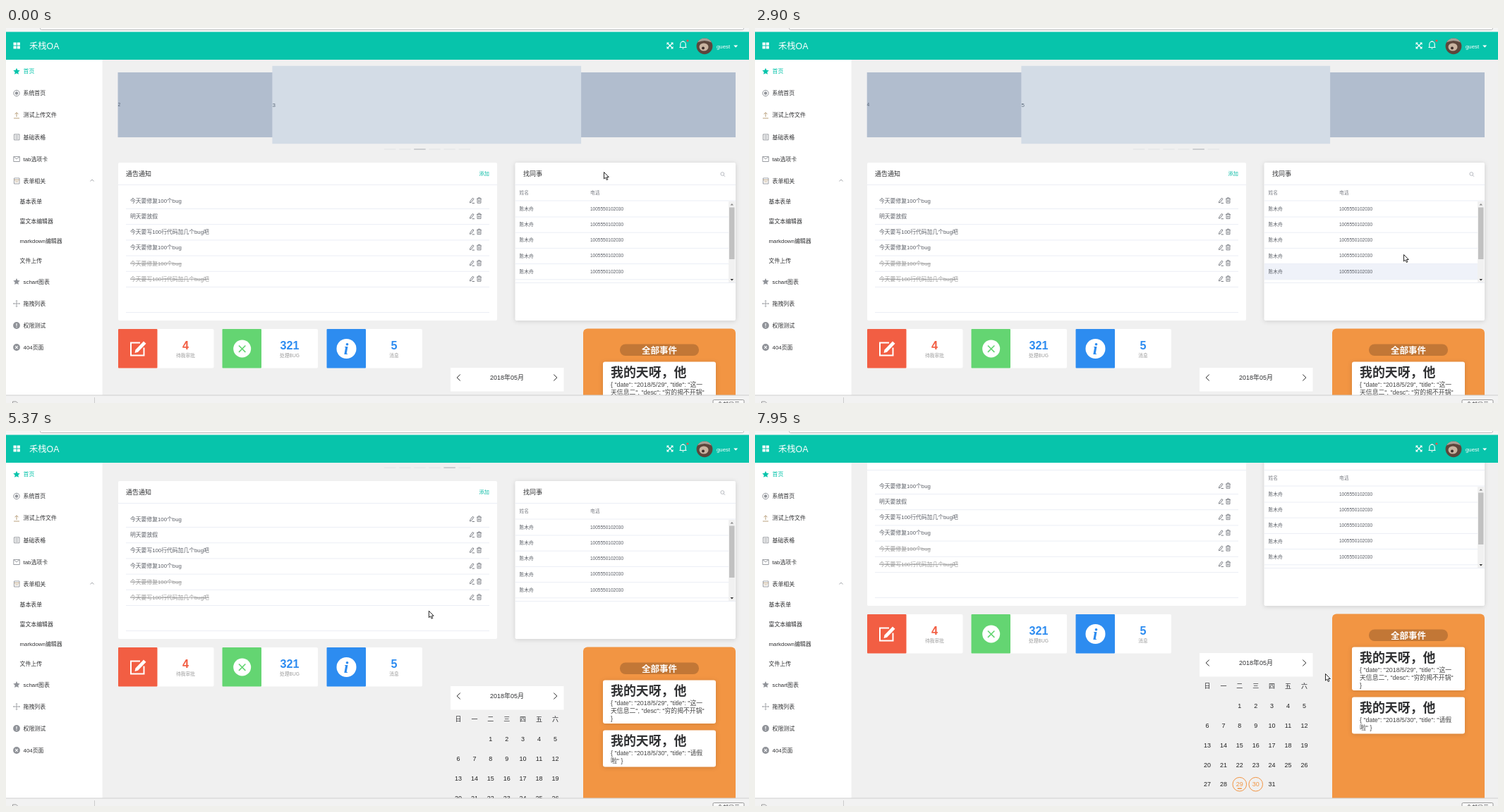
Animation of 1053x532 px, one loop 8000 ms. Source, as an HTML page:

```html
<!DOCTYPE html>
<html>
<head>
<meta charset="utf-8">
<title>OA dashboard</title>
<style>
html, body { margin: 0; width: 100%; height: 100%; overflow: hidden; background: #f0f0f0; }
#stage { display: block; width: 1053px; height: 532px;
  font-family: "Liberation Sans", Arial, "Noto Sans CJK SC", "Noto Sans CJK", sans-serif; }
.shadow { filter: drop-shadow(0 1px 3px rgba(0,0,0,.14)); }
</style>
</head>
<body>
<svg id="stage" viewBox="0 0 1053 532"></svg>
<script>
const LOOP = 8000, TEAL = '#07c4ab', INK = '#303133', BODY = '#5a5e66', LINE = '#ebeef5', ORANGE = '#f29543';
const ROW = 22.2, SLIDES = 6;
const CAR = { x: 158.5, y: 53.5, w: 875.5, h: 111, scale: .83 };

// ---- drawing helpers; text is placed by its vertical centre ----
const rect = (x, y, w, h, fill, more = '') =>
  `<rect x="${x}" y="${y}" width="${w}" height="${h}" fill="${fill}" ${more}/>`;
const circle = (x, y, r, fill, more = '') => `<circle cx="${x}" cy="${y}" r="${r}" fill="${fill}" ${more}/>`;
const stroke = (d, color, w = 1, more = '') =>
  `<path d="${d}" fill="none" stroke="${color}" stroke-width="${w}" ${more}/>`;
const shape = (d, fill, more = '') => `<path d="${d}" fill="${fill}" ${more}/>`;
const text = (x, y, size, str, fill = BODY, more = '') =>
  `<text x="${x}" y="${y + size * .36}" font-size="${size}" fill="${fill}" ${more}>${str}</text>`;
const MID = 'text-anchor="middle"', BOLD = 'font-weight="700"';
const hline = (x1, x2, y, color = LINE) => stroke(`M${x1} ${y}H${x2}`, color);
const times = (n, fn) => Array.from({ length: n }, (_, i) => fn(i)).join('');
const chevron = (x, y, s, dir, color, w = 1) =>
  stroke(`M${x - dir * s / 2} ${y - s}l${dir * s} ${s}l${-dir * s} ${s}`, color, w);
const star = (x, y, r, fill) => {
  const pts = Array.from({ length: 10 }, (_, i) => {
    const a = i * Math.PI / 5, q = i % 2 ? r * .48 : r;
    return [x + q * Math.sin(a), y - q * Math.cos(a)];
  });
  return `<polygon points="${pts}" fill="${fill}"/>`;
};

// ---- page content ----
function notices() {
  const fix = '今天要修复100个bug', write = '今天要写100行代码加几个bug吧';
  const rows = [fix, '明天要放假', write, fix, fix, write];
  return rect(159, 191, 537, 224, '#fff', 'rx="2" class="shadow" id="noticeShadow"')
    + rect(159, 191, 537, 224, '#fff', 'rx="2"')
    + rect(170, 0, 515, ROW, '#f5f7fb', 'id="noticeHover"')
    + text(170, 207, 9, '通告通知', INK) + text(670.5, 206.5, 7.2, '添加', '#10bda8')
    + hline(159, 696, 222.5) + hline(170, 685, 403.5)
    + rows.map((str, i) => {
      const y = 245 + ROW * i, done = i > 3;
      return text(176, y, 7.8, str, done ? '#999' : BODY, done ? 'text-decoration="line-through"' : '')
        + hline(170, 685, y + 11.5)
        + `<g transform="translate(0 ${y - 245})">`
        + stroke('M657.8 246l3.6-4.7 1.6 1.2-3.6 4.8-1.9.7zM660.5 248.5h3.5', BODY, .8)
        + stroke('M667 242.3h7M669 242v-1.2h3v1.2M668 242.5v5.8h5v-5.8M669.7 244v3M671.3 244v3', BODY, .7)
        + '</g>';
    }).join('');
}

function colleagues() {
  const rows = times(6, i => text(5.5, 11 + ROW * i, 6.8, '陈木舟') + text(106, 11 + ROW * i, 6.5, '1005550102030')
    + hline(0, 302, 22.5 + ROW * i));
  return rect(721.5, 191, 312.5, 224, '#fff', 'rx="2" class="shadow"')
    + text(733, 207, 9, '找同事', INK)
    + `<g id="search" fill="none"><circle cx="1015.3" cy="207" r="2.4"/><path d="M1017 208.8l2 2"/></g>`
    + hline(721.5, 1034, 222.5)
    + text(727.5, 233.5, 6.8, '姓名', '#7c7f86') + text(828, 233.5, 6.8, '电话', '#7c7f86')
    + hline(722, 1034, 245)
    + `<svg x="722" y="245.5" width="302" height="116">${rect(0, 0, 302, ROW, '#eff2f9', 'id="tableHover"')}${rows}</svg>`
    + rect(1024, 246, 9.5, 115.5, '#f1f1f1') + rect(1025, 254.5, 7.5, 73.5, '#c1c1c1')
    + shape('M1026.5 251.5h4.5l-2.2-2.5z', '#888') + shape('M1026.5 356h4.5l-2.2 2.5z', '#333')
    + hline(722, 1034, 361.5);
}

function stats() {
  const card = (x, color, icon, num, label, numColor) =>
    rect(x, 427, 135.5, 55.5, '#fff', 'rx="2"') + rect(x, 427, 55.5, 55.5, color, 'rx="1"') + icon
    + text(x + 95.5, 450.5, 16.2, num, numColor, MID + BOLD) + text(x + 95.5, 464.5, 6.7, label, '#999', MID);
  const edit = stroke('M190 446.5h-13v18h18.500v-11', '#fff', 2)
    + shape('M183.500 456.500l11.500-12 3.500 3.300-11.500 12-4.500 1.200z', '#fff');
  const cross = circle(334.7, 455, 12.5, '#fff') + stroke('M330 450.500l9.400 9.400m0-9.400l-9.400 9.400', '#64d572', 1.6);
  const info = circle(482.5, 455, 14, '#fff')
    + text(482, 454.5, 24, 'i', '#2d8cf0', `${MID} font-weight="700" font-style="italic" style="font-family:'Liberation Serif',serif"`);
  return card(159, '#f25e43', edit, '4', '待我审批', '#f25e43')
    + card(306.5, '#64d572', cross, '321', '处理BUG', '#2d8cf0')
    + card(454.5, '#2d8cf0', info, '5', '消息', '#2d8cf0');
}

function calendar() {
  const col = i => 641 + 22.9 * i;
  return rect(630, 482, 160.5, 33.5, '#fff')
    + chevron(641.5, 496, 4.5, -1, '#222') + chevron(778.5, 496, 4.5, 1, '#222')
    + text(710, 496, 9, '2018年05月', INK, MID)
    + [...'日一二三四五六'].map((d, i) => text(col(i), 529, 9, d, INK, MID)).join('')
    + times(31, i => {
      const x = col((i + 2) % 7), y = 557 + 27.8 * Math.floor((i + 2) / 7), marked = i === 28 || i === 29;
      return text(x, y, 9, i + 1, marked ? ORANGE : '#222', MID)
        + (marked ? circle(x, y, 9.8, 'none', `stroke="${ORANGE}"`) : '')
        + (i === 28 ? rect(x - 3, y + 5.3, 6, 1.5, ORANGE) : '');
    });
}

function events() {
  const card = (y, h, lines) => rect(846, y, 160, h, '#fff', 'rx="3" class="shadow"')
    + text(857, y + 15.5, 17.9, '我的天呀，他', INK, BOLD)
    + lines.map((s, i) => text(857, y + 32 + 11.3 * i, 8.85, s, '#444')).join('');
  return rect(818, 426.5, 216, 300, ORANGE, 'rx="6"')
    + rect(870, 448.5, 112, 16.5, '#c27736', 'rx="8"')
    + text(926, 457, 12.5, '全部事件', '#fff', MID + BOLD)
    + card(473.5, 61.5, ['{ "date": "2018/5/29", "title": "这一', '天信息二", "desc": "穷的揭不开锅"', '}'])
    + card(544.5, 52, ['{ "date": "2018/5/30", "title": "请假', '啦" }']);
}

// ---- fixed frame around the page ----
function header() {
  return rect(0, 0, 1053, 6, '#f5f5f5') + rect(48.5, -8, 997, 10.5, '#fff', 'rx="2" stroke="#bbb"')
    + rect(0, 5.5, 1053, 39.5, TEAL)
    + times(4, i => rect(10.5 + 5.2 * (i % 2), 20.5 + 5 * (i >> 1), 4.2, 4, '#fff'))
    + text(33, 25.5, 12.3, '禾栈OA', '#fff')
    + stroke('M937.500 21.500l7 7m0-7l-7 7', '#fff', 1.2)
    + shape('M936.500 20.500h3.500l-3.500 3.500zM945.500 20.500v3.500l-3.500-3.500zM936.500 29.500v-3.500l3.500 3.500zM945.500 29.500h-3.500l3.500-3.500z', '#fff')
    + stroke('M954.500 27.500h10M955.800 27.500v-4.500a3.700 3.700 0 0 1 7.400 0v4.500M958.500 29.300h2M959.500 19v-1', '#fff', 1.1)
    + circle(966, 18, 1.6, '#f0524a')
    + circle(990, 25.8, 11.4, '#5d463c') + shape('M980 20.500a11.400 11.400 0 0 1 20 0q-10-5-20 0z', '#a9a097')
    + `<ellipse cx="989" cy="27" rx="6.500" ry="5.500" fill="#c9b3a0"/>` + circle(988, 28.5, 2, '#3e2e2a')
    + text(1007, 25.8, 7.8, 'guest', '#fff') + shape('M1031.200 24.500h6l-3 3.200z', '#fff');
}

function sidebar() {
  const grey = '#909399';
  const box = y => stroke(`M11.500 ${y - 4}h7.500v8h-7.500z`, grey, .9);
  const badge = (y, d) => circle(15, y, 4.9, grey) + stroke(d, '#fff', 1.1);
  const items = [
    [61.5, '首页', star(15, 61.8, 5, TEAL)],
    [92.5, '系统首页', circle(15, 92.5, 4.2, 'none', `stroke="${grey}"`) + circle(15, 92.5, 2.2, grey)],
    [123.5, '测试上传文件', stroke('M15 126v-6M12.500 122.300l2.500-2.500 2.500 2.500M11 128h8', '#b9a07c')],
    [154.8, '基础表格', box(154.8) + stroke('M13 152.800h4.500M13 154.800h4.500M13 156.800h4.500', grey, .8)],
    [186, 'tab选项卡', stroke('M10.800 182.500h8.500v7h-8.500zl4.200 3.500 4.300-3.500', grey, .9)],
    [217, '表单相关', box(217) + stroke('M11.500 215.500h7.500M13 218h4.500', '#b9a07c', .9)],
    [359.7, 'schart图表', star(15, 360, 5, grey)],
    [391, '拖拽列表', stroke('M15 386.500v9M10.500 391h9M14 387.500l1-1 1 1M14 394.500l1 1 1-1M11.500 390l-1 1 1 1M18.500 390l1 1-1 1', grey, .8)],
    [422, '权限测试', badge(422, 'M15 419v3.700M15 423.700v1.300')],
    [453, '404页面', badge(453, 'M13.200 451.200l3.600 3.600m0-3.600l-3.600 3.600')]
  ];
  const subs = ['基本表单', '富文本编辑器', 'markdown编辑器', '文件上传'];
  return rect(0, 45, 136.5, 476, '#fff')
    + items.map(([y, s, icon], i) => icon + text(24.5, y, 7.9, s, i ? INK : TEAL)).join('')
    + subs.map((s, i) => text(19.5, 245.8 + 28 * i, 7.9, s, INK)).join('')
    + stroke('M119.500 217.500l2.500-2.500 2.500 2.500', grey, .8);
}

function footer() {
  return rect(0, 521, 1053, 11, '#f2f2f2') + hline(0, 1053, 521, '#cfcfcf')
    + stroke('M125.500 524v8', '#ccc') + stroke('M9.500 533v-3h5l2 2', '#999')
    + rect(1002, 527.5, 44, 10, '#fafafa', 'rx="1.500" stroke="#999"') + text(1024, 534, 8, '全部显示', INK, MID);
}

const arrow = (id, x, dir) => `<g id="${id}">${circle(x, 109, 10, '#1f2d3d')}</g>${chevron(x, 109, 2.6, dir, '#fff')}`;

document.getElementById('stage').innerHTML = rect(0, 0, 1053, 532, '#f0f0f0')
  + `<g id="page"><svg id="slides" x="${CAR.x}" y="${CAR.y}" width="${CAR.w}" height="${CAR.h}"></svg><g id="arrows">`
  + arrow('prev', 177.5, -1) + arrow('next', 1015, 1) + '</g><g id="dots"></g>'
  + notices() + colleagues() + stats() + calendar() + events() + '</g>'
  + header() + sidebar() + footer()
  + `<g id="pointer" fill="#fff" stroke="#111" stroke-width=".9" stroke-linejoin="round">
  <path id="arrowShape" d="M0 0V9.500L2.200 7.500 3.800 11 5.400 10.300 3.900 7H6.800Z"/>
  <path id="handShape" d="M0 1q1-1.500 2 0v4l4 1q1.500.5 1.200 2l-.7 3.500v1.500h-5v-1.500l-3-4q0-1.500 1.500-.5z"/></g>`;

const el = Object.fromEntries([...document.querySelectorAll('[id]')].map(n => [n.id, n]));

// ---- motion: [time, values...] keys, straight lines between them ----
function at(keys, t) {
  const i = keys.findIndex(k => k[0] > t);
  if (i < 1) return (i ? keys[keys.length - 1] : keys[0]).slice(1);
  const a = keys[i - 1], b = keys[i], p = (t - a[0]) / (b[0] - a[0]);
  return a.slice(1).map((v, j) => v + (b[j + 1] - v) * p);
}
const POINTER = [
  [130, 847.5, 204.5], [560, 1014, 104], [2150, 1014, 104], [2400, 925, 350], [2710, 925, 350],
  [2890, 919.5, 321.5], [3020, 919.5, 321.5], [3130, 877, 315.5], [3270, 877, 315.5], [3440, 868, 300],
  [3640, 868, 300], [4150, 546.5, 273.5], [5130, 546.5, 273.5], [5650, 660.5, 234], [6360, 660.5, 234],
  [6710, 577.5, 324], [7020, 460, 311], [7160, 460, 311], [7240, 367.5, 282.5], [7400, 367.5, 282.5],
  [7550, 266.5, 282.5], [7700, 266.5, 282.5], [7940, 808.5, 344.5]
];
const SCROLL = [[4260, 0], [4820, 171], [5110, 171], [5700, 55.7], [6340, 55.7], [6710, 102], [7010, 167]];
const ARROWS = [[400, 0], [600, 1], [2200, 1], [2450, 0]];
const TURNS = [885, 1780, 5650];   // times at which the carousel advances
const HOVER_LAG = 150;

function slot(i, active) {
  let d = i - active;
  if (Math.abs(d) >= 3) d -= 6 * Math.sign(d);
  const { w, scale } = CAR;
  const x = Math.abs(d) <= 1 ? w * ((2 - scale) * d + 1) / 4
    : d < 0 ? -(1 + scale) * w / 4 : (3 + scale) * w / 4;
  return { x, scale: d ? scale : 1, z: Math.max(0, 2 - Math.abs(d)) };
}

function carousel(t) {
  const turns = TURNS.filter(s => s <= t), active = 2 + turns.length;
  const q = turns.length ? Math.min(1, (t - turns[turns.length - 1]) / 400) : 1;
  const p = q * q * (3 - 2 * q), w = CAR.w / 2, h = CAR.h;
  el.slides.innerHTML = Array.from({ length: SLIDES }, (_, i) => {
    const a = slot(i, turns.length ? active - 1 : active), b = slot(i, active);
    const x = a.x + (b.x - a.x) * p, s = a.scale + (b.scale - a.scale) * p;
    const fill = i === active ? ['#d3dce6', '#99a9bf'][i % 2] : ['#dee4ec', '#b1bdce'][i % 2];
    return { z: b.z, svg: `<g transform="translate(${x + w / 2} ${h / 2}) scale(${s}) translate(${-w / 2} ${-h / 2})">`
      + rect(0, 0, w, h, fill) + text(0, h / 2, 8, i + 1, '#475669', 'opacity=".85"') + '</g>' };
  }).sort((a, b) => a.z - b.z).map(s => s.svg).join('');
  el.dots.innerHTML = times(SLIDES, i => rect(536 + 21.1 * i, 171.5, 16.5, 1, i === active ? '#a9adb3' : '#e2e3e6'));
}

function hoverRow(node, top, first, x, y, x1, x2, bottom) {
  const i = Math.floor((y - first) / ROW);
  const on = x > x1 && x < x2 && i >= 0 && i < 6 && y < bottom;
  node.setAttribute('opacity', on ? 1 : 0);
  node.setAttribute('y', top + i * ROW);
}

function draw() {
  const t = performance.now() % LOOP;
  const [x, y] = at(POINTER, t), [scroll] = at(SCROLL, t);
  const hand = Math.hypot(x - 1015, y + scroll - 109) < 10;
  carousel(t);
  el.page.setAttribute('transform', `translate(0 ${-scroll})`);
  el.pointer.setAttribute('transform', `translate(${x} ${y})`);
  el.arrowShape.setAttribute('opacity', hand ? 0 : 1);
  el.handShape.setAttribute('opacity', hand ? 1 : 0);
  el.arrows.setAttribute('opacity', at(ARROWS, t)[0]);
  el.prev.setAttribute('opacity', .11);
  el.next.setAttribute('opacity', hand ? .3 : .11);
  const lit = t > 480 && t < 2400 || t > 5700 && t < 6090;
  el.search.setAttribute('stroke', lit ? '#1fb8ac' : '#b9bcc2');

  const [hx, hy] = at(POINTER, t - HOVER_LAG), py = hy + at(SCROLL, t - HOVER_LAG)[0];
  hoverRow(el.noticeHover, 234.3, 234.3, hx, py, 170, 685, 368);
  hoverRow(el.tableHover, 0, 245.5, hx, py, 722, 1024, 361.5);
  el.noticeShadow.setAttribute('opacity', hx > 159 && hx < 696 && py > 191 && py < 415 ? 1 : 0);
  requestAnimationFrame(draw);
}
draw();
</script>
</body>
</html>
```
